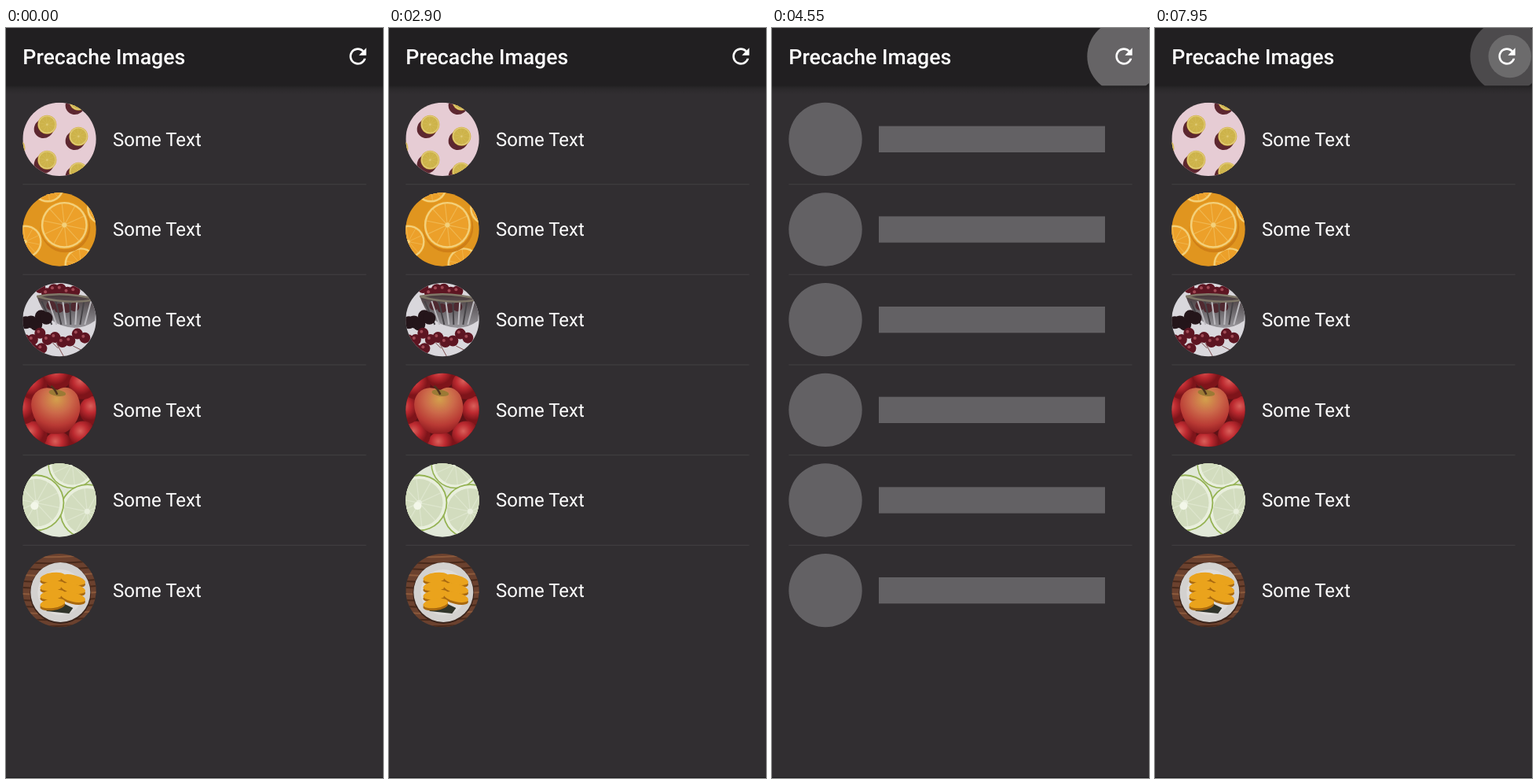
An HTML page that plays this animation: 480 px wide and 953 px high, repeating every 8 s.

```html
<!DOCTYPE html>
<html lang="en">
<head>
<meta charset="utf-8">
<title>Precache Images</title>
<style>
  html, body { margin: 0; width: 100%; height: 100%; overflow: hidden; background: #312e31; }
  svg { display: block; width: 480px; height: 953px; }
  text { font-family: Roboto, sans-serif; fill: #fff; text-rendering: geometricPrecision; }
</style>
</head>
<body>
<svg viewBox="0 0 480 953">
  <defs>
    <linearGradient id="shade" x2="0" y2="1">
      <stop offset="0" stop-color="#232123"/>
      <stop offset=".4" stop-color="#2b292b"/>
      <stop offset="1" stop-color="#312e31"/>
    </linearGradient>
    <radialGradient id="apple" cx=".52" cy=".25" r=".75">
      <stop offset="0" stop-color="#d3a14c"/>
      <stop offset=".4" stop-color="#cc6a4a"/>
      <stop offset=".75" stop-color="#b93a34"/>
      <stop offset="1" stop-color="#8f1c20"/>
    </radialGradient>
    <radialGradient id="red" cx=".4" cy=".35">
      <stop offset="0" stop-color="#d9605a"/>
      <stop offset=".5" stop-color="#bd2a30"/>
      <stop offset="1" stop-color="#7e141a"/>
    </radialGradient>
    <linearGradient id="glass" x2="0" y2="1">
      <stop offset="0" stop-color="#463638"/>
      <stop offset=".5" stop-color="#6b676b"/>
      <stop offset="1" stop-color="#98969b"/>
    </linearGradient>
    <clipPath id="disc"><circle cx="46.67" cy="46.67" r="46.67"/></clipPath>
    <clipPath id="bar"><path d="M0 0H480V73.33H0z"/></clipPath>
  </defs>
  <rect width="480" height="953" fill="#312e31"/>
  <rect y="73" width="480" height="11" fill="url(#shade)"/>
  <rect width="480" height="73.33" fill="#211f21"/>
  <rect y="952" width="480" height="1" fill="#1d1c1f"/>
  <text x="21.33" y="46" font-size="26.67" font-weight="500">Precache Images</text>
  <g clip-path="url(#bar)" fill="#ccc">
    <circle id="glow" cx="448" cy="36" r="46.67"/>
    <circle id="splash" cy="36"/>
  </g>
  <path transform="translate(432 20) scale(1.3333)" fill="#fff" d="M17.65 6.35C16.2 4.9 14.21 4 12 4c-4.42 0-7.99 3.58-7.99 8s3.57 8 7.99 8c3.73 0 6.84-2.55 7.73-6h-2.08c-.82 2.33-3.04 4-5.65 4-3.31 0-6-2.69-6-6s2.69-6 6-6c1.66 0 3.14.69 4.22 1.78L13 11h7V4l-2.35 2.35z"/>
  <g id="lines"></g>
  <g id="loaded"></g>
  <g id="blank" fill="#636164"></g>
</svg>
<script>
const $ = id => document.getElementById(id);
const ROW = 114.667, TOP = 94.667, R = 46.67, LOOP = 8000, STEP = 50;

let seed = 7;
const random = () => (seed = seed * 16807 % 2147483647) / 2147483647;
const times = (n, draw) => Array.from({ length: n }, (_, i) => draw(i)).join('');
const fill = color => `<rect width="94" height="94" fill="${color}"/>`;
const dot = (x, y, r, color) => `<circle cx="${x}" cy="${y}" r="${r}" fill="${color}"/>`;
const path = (d, color) => `<path d="${d}" fill="${color}"/>`;
const line = (d, color, width) => `<path d="${d}" fill="none" stroke="${color}" stroke-width="${width}"/>`;
const oval = (x, y, rx, ry, turn, color) =>
  `<ellipse rx="${rx}" ry="${ry}" transform="translate(${x} ${y}) rotate(${turn})" fill="${color}"/>`;

// n items evenly around a point
const ring = (n, x, y, reach, phase, draw) => times(n, i => {
  const a = phase + i * 2 * Math.PI / n;
  return draw(x + reach * Math.cos(a), y + reach * Math.sin(a));
});

// n items in a row with random heights
const scatter = (n, x, y, w, h, draw) =>
  times(n, i => draw(x + w * i / (n - 1), y + h * random()));

// Citrus slice: peel, pith, flesh and membranes
function slice(x, y, r, [peel, pith, flesh], core = .84) {
  return dot(x, y, r, peel) + dot(x, y, r * .95, pith) + dot(x, y, r * core, flesh) +
    ring(10, x, y, r * core, .2, (px, py) => line(`M${x} ${y}L${px} ${py}`, pith + '80', r / 28)) +
    dot(x, y, r * .1, pith);
}

function lemons() {
  const skin = ['#d0ab38', '#e0cb78', '#cdb34a'];
  return fill('#e6ccd4') + times(9, n => {
    const i = n % 3 - 1, j = Math.floor(n / 3) - 1;
    const x = 31 + 40 * i, y = 28 + 15 * i + 45 * j;
    return oval(x - 4, y + 5, 13, 12, -35, '#5d2730') + slice(x, y, 12, skin);
  });
}

function oranges() {
  const skin = ['#e5981f', '#f3d07a', '#eca02a'];
  return fill('#e0951f') +
    ring(4, 53, 41, 54, 1.17, (x, y) => slice(x, y, 22, skin)) +
    dot(54, 44, 32, '#cf7f17') + slice(53, 41, 31, skin, .87);
}

function cherries() {
  const berry = (x, y) => dot(x, y, 7, '#5d1522') + dot(x - 2, y - 2, 2, '#a04a55');
  return fill('#d9d7dc') +
    scatter(6, 22, 6, 44, 8, berry) +
    path('M18 17Q54 10 94 21L92 48Q73 62 50 54Q28 47 18 17z', 'url(#glass)') +
    scatter(4, 36, 26, 30, 8, (x, y) => dot(x, y, 6, '#4f2930')) +
    times(8, i => line(`M${24 + i * 9} 23L${37 + i * 6} 53`, i % 2 ? '#bdbbc0' : '#464347', 2)) +
    line('M18 17Q54 10 94 21Q56 28 18 17z', '#7f7767', 2.5) +
    scatter(5, 4, 38, 26, 18, (x, y) => dot(x, y, 8, '#24151a')) +
    line('M41 73l12 22M30 68l15 15M64 80l12 6', '#7c4c4d', 1) +
    scatter(9, 3, 63, 76, 13, berry) + scatter(2, 13, 79, 11, 6, berry);
}

function apples() {
  return fill('#5e1216') +
    ring(8, 45, 47, 45, 0, (x, y) => dot(x, y, 18, 'url(#red)')) +
    path('M43 22Q58 12 69 27Q78 46 67 63Q58 78 43 77Q25 79 17 61Q5 38 16 25Q28 14 43 22z', 'url(#apple)') +
    oval(44, 25, 11, 4, 8, '#9b7a35') +
    line('M44 27Q41 20 36 16', '#4e321d', 2.5);
}

function limes() {
  const skin = ['#94b252', '#e9efdd', '#d2dcbe'];
  return fill('#e1e8d8') + slice(63, 1, 31, skin) + slice(82, 61, 35, skin) +
    slice(17, 50, 36, skin) + dot(15, 54, 5, '#f3f7e9');
}

function mango() {
  return fill('#6b412e') +
    times(12, i => line(`M0 ${i * 8 + 3}Q40 ${i * 8 + 6} 94 ${i * 8 + 1}`, i % 3 ? '#48291b' : '#8c5a3c', 2)) +
    dot(48, 50, 39, '#3a241b') + dot(48, 49, 38, '#d3d1cf') + dot(48, 49, 29, '#dedcda') +
    path('M22 66L39 57L64 69L59 76L31 73z', '#30342a') +
    times(7, i => {
      const x = 35 + i % 2 * 26, y = 30 + Math.floor(i / 2) * 11 + i % 2 * 3, turn = i % 2 ? 14 : -8;
      return oval(x + 3, y + 3, 16, 6, turn, '#a9690f') + oval(x + 3, y, 16, 6, turn, '#eaa31c');
    });
}

[lemons, oranges, cherries, apples, limes, mango].forEach((photo, i) => {
  const y = TOP + i * ROW, mid = y + R;
  $('loaded').innerHTML += `<g transform="translate(21.33 ${y})"><g clip-path="url(#disc)">${photo()}</g></g>
    <text x="136" y="${Math.floor(mid + 8.7)}" font-size="24">Some Text</text>`;
  $('blank').innerHTML += `<circle cx="68" cy="${mid}" r="${R}"/><rect x="136" y="${mid - 16.67}" width="288" height="33.33"/>`;
  if (i < 5) $('lines').innerHTML += `<rect x="21.33" y="${y + 103.3}" width="437.33" height="1.33" fill="#3e3c3e"/>`;
});

// Touch down, touch up, last repaint of the fade, content ready
const presses = [
  { down: 30, up: 580, still: 750, ready: 2900 },
  { down: 3695, up: 4530, still: 4750, ready: 6750 },
  { down: 7365, up: LOOP, still: LOOP, ready: LOOP }
];
const clamp = v => Math.max(0, Math.min(1, v));

function draw(time) {
  const press = presses.find(p => time >= p.down && time < p.ready);
  const waiting = !!press && time >= press.up;
  $('loaded').style.display = waiting ? 'none' : '';
  $('blank').style.display = waiting ? '' : 'none';

  let glow = 0, splash = 0, grow = 0;
  if (press) {
    const t = Math.min(time, press.still);
    splash = 1 - clamp((t - press.up) / 200);
    glow = clamp((t - press.down) / 200) * splash;
    grow = clamp((Math.min(t, press.up) - press.down) / 1000 + Math.max(0, t - press.up) / 35);
  }
  $('glow').setAttribute('opacity', glow * .25);
  $('splash').setAttribute('opacity', splash * .25);
  $('splash').setAttribute('r', R * grow);
  $('splash').setAttribute('cx', 457 - 9 * grow);
}

const start = performance.now();
function tick() {
  const time = (performance.now() - start) % LOOP;
  draw(Math.floor(time / STEP) * STEP);
  requestAnimationFrame(tick);
}
tick();
</script>
</body>
</html>
```
